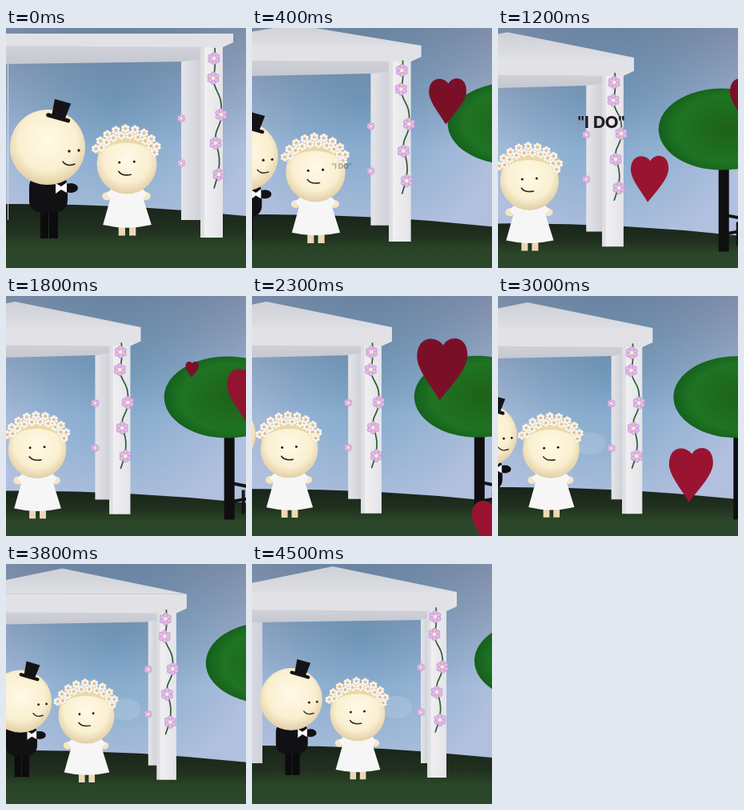
Animation, 300 px wide and 300 px high, one loop 4600 ms. Source, as an HTML page:

```html
<!DOCTYPE html>
<html lang="en">
<head>
<meta charset="utf-8">
<title>I do</title>
<style>
html,body{margin:0;width:100%;height:100%;overflow:hidden;background:#9db4d4}
svg{display:block;width:100%;height:100%}
#vow{font:900 20px Lato,"Open Sans",sans-serif;text-anchor:middle;fill:#211d24;stroke:#d5d3d8;stroke-width:.6;paint-order:stroke}
.face{fill:none;stroke:#2b2420;stroke-width:1.5;stroke-linecap:round}
.dot{fill:#211c1a}
</style>
</head>
<body>
<svg id="stage" viewBox="0 0 300 300" preserveAspectRatio="none">
<defs>
  <radialGradient id="sky" cx=".45" cy=".3" r=".62"><stop stop-color="#7ba5c8"/><stop offset=".45" stop-color="#8fb0d1"/><stop offset="1" stop-color="#b1c0de"/></radialGradient>
  <linearGradient id="dusk" x2="0" y2="1"><stop stop-color="#2b3a52" stop-opacity=".38"/><stop offset=".5" stop-color="#2b3a52" stop-opacity="0"/></linearGradient>
  <linearGradient id="grass" x2="0" y2="1"><stop stop-color="#19241a"/><stop offset=".4" stop-color="#20301e"/><stop offset=".65" stop-color="#2a4427"/><stop offset="1" stop-color="#2b482b"/></linearGradient>
  <linearGradient id="post"><stop stop-color="#dcdce0"/><stop offset=".18" stop-color="#e2e2e5"/><stop offset=".2" stop-color="#f0eff1"/><stop offset="1" stop-color="#e4e3e8"/></linearGradient>
  <linearGradient id="rearPost"><stop stop-color="#e4e4e8"/><stop offset="1" stop-color="#cfd1d9"/></linearGradient>
  <linearGradient id="roofFill" x2="0" y2="1"><stop stop-color="#cfd0d6"/><stop offset="1" stop-color="#dedfe3"/></linearGradient>
  <linearGradient id="beamFill" x2="0" y2="1"><stop stop-color="#d2d3d9"/><stop offset="1" stop-color="#c6c8d1"/></linearGradient>
  <radialGradient id="skin" cx=".5" cy=".42" r=".6"><stop stop-color="#fffae6"/><stop offset=".65" stop-color="#faefd0"/><stop offset="1" stop-color="#dfcba0"/></radialGradient>
  <radialGradient id="leaf" cx=".55" cy=".5" r=".55"><stop stop-color="#1e6118"/><stop offset=".75" stop-color="#1f7423"/><stop offset="1" stop-color="#14601c"/></radialGradient>
  <g id="daisy"></g>
  <g id="bloom"></g>
  <path id="heart" d="M-.05 .61C-.2 .35-.5 0-.5-.25C-.5-.68-.12-.68 .02-.48C.12-.68 .5-.7 .5-.28C.5 0 .15 .35-.05 .61Z"/>
</defs>
<rect width="300" height="300" fill="url(#sky)"/>
<rect width="300" height="300" fill="url(#dusk)"/>
<ellipse id="wisp" rx="20" ry="14" fill="#e3e8f3"/>
<path id="ground" fill="url(#grass)"/>
<g id="tree">
  <path d="M-4 30H9V153H-4Z" fill="#100f10"/>
  <path d="M8 108L48 116M8 130L48 123M20 116V146" stroke="#151315" stroke-width="4" fill="none"/>
  <ellipse rx="79" ry="51" fill="url(#leaf)"/>
</g>
<g id="hearts"></g>
<path id="leftPost" fill="url(#rearPost)"/>
<path id="backPost" fill="url(#rearPost)"/>
<g id="backFlowers"></g>
<path id="beam" fill="url(#beamFill)"/>
<path id="frontPost" fill="url(#post)"/>
<path id="slab" fill="#e2e2e6"/>
<path id="roof" fill="url(#roofFill)"/>
<path id="vine" fill="none" stroke="#2a5c33" stroke-width="1.7"/>
<g id="flowers"></g>
<g id="groom">
  <path d="M-9 76H1V114H-9ZM2 76H13V114H2Z" fill="#0c0b0d"/>
  <rect x="-23" y="34" width="48" height="48" rx="15" fill="#111013"/>
  <ellipse cx="29" cy="51" rx="9" ry="6" fill="#111013"/>
  <circle r="47" fill="url(#skin)"/>
  <path d="M10 45L17 49L24 44V57L17 53L10 58Z" fill="#fafafa"/>
  <g transform="translate(15 -45)rotate(16)" fill="#151315"><path d="M-10-13H11L9 8H-8Z"/><rect x="-15" y="6" width="31" height="5" rx="2.5"/></g>
  <circle class="dot" cx="27" cy="5" r="1.7"/><circle class="dot" cx="39" cy="4" r="1.7"/>
  <path class="face" d="M19 18Q24 25 34 21"/>
</g>
<g id="bride">
  <path d="M-10 72H-2V87H-10ZM3 72H11V87H3Z" fill="#ecd8b4"/>
  <ellipse cx="-24" cy="39" rx="6" ry="5" fill="#f5e6c4"/><ellipse cx="23" cy="39" rx="6" ry="5" fill="#f5e6c4"/>
  <path d="M-16 28H17L25 36L20 42L30 74Q0 81-29 74L-20 42L-25 36Z" fill="#f7f6f7"/>
  <circle r="36.5" fill="url(#skin)"/>
  <path d="M-36-10C-29-46 30-46 36-8C24-31-22-32-36-10Z" fill="#ead9a4"/>
  <g id="crown"></g>
  <circle class="dot" cx="-9" cy="-2" r="1.5"/><circle class="dot" cx="9" cy="-3" r="1.5"/>
  <path class="face" d="M-10 9Q-6 15 5 13"/>
</g>
<text id="vow" y="7">"I DO"</text>
</svg>
<script>
const $ = id => document.getElementById(id);
const LOOP = 4600, STEP = 100;

// Camera keys: time, x of the front post, y of the eave.
const CAMERA = [[0, 243, 7], [400, 171, 22], [1200, 130, 37], [2300, 136, 39], [3000, 155, 40], [4500, 219, 35]];
// Hearts: offset from the tree, full width.
const HEARTS = [[-79, 54], [34, 60], [-44, 63]];
// Garland: sideways sway and share of its length.
const GARLAND = [[0, 0], [-1, .17], [9, .485], [2, .73], [6, 1]];

const clamp = (v, lo = 0, hi = 1) => Math.min(hi, Math.max(lo, v));
const mix = (a, b, k) => a + (b - a) * k;

// Smooth curve through unevenly timed keys.
function curve(t, keys, col) {
  const last = keys.length - 1;
  if (t >= keys[last][0]) return keys[last][col];
  const i = keys.findIndex(k => k[0] > t) - 1;
  const slope = n => {
    const a = keys[Math.max(n - 1, 0)], b = keys[Math.min(n + 1, last)];
    return (b[col] - a[col]) / (b[0] - a[0]);
  };
  const h = keys[i + 1][0] - keys[i][0], u = (t - keys[i][0]) / h, v = 1 - u;
  return mix(keys[i][col], keys[i + 1][col], u * u * (3 - 2 * u))
    + h * u * v * (slope(i) * v - slope(i + 1) * u);
}
function add(parent, tag, attrs) {
  const el = document.createElementNS("http://www.w3.org/2000/svg", tag);
  for (const k in attrs) el.setAttribute(k, attrs[k]);
  return parent.appendChild(el);
}
const use = (parent, id) => add($(parent), "use", {href: "#" + id});
function place(el, x, y, s = 1) {
  el.setAttribute("transform", `translate(${x} ${y})scale(${s})`);
}
const poly = (id, ...pts) => $(id).setAttribute("d", "M" + pts.join("L") + "Z");
const box = (id, l, t, r, b) => poly(id, [l, t], [r, t], [r, b], [l, b]);

function petals(id, reach, size, color, center, edge) {
  for (let i = 0; i < 6; i++) {
    const a = i / 3 * Math.PI - Math.PI / 2;
    add($(id), "circle", {cx: reach * Math.cos(a), cy: reach * Math.sin(a), r: size, fill: color, stroke: edge, "stroke-width": .6});
  }
  add($(id), "circle", {r: size * .85, fill: center});
}
petals("daisy", 3.4, 2, "#fffdf8", "#e9bd80", "#ddd2c0");
petals("bloom", 5.4, 3.2, "#e2b9ea", "#fbf0c4", "#b284c2");

// Two rows of daisies over the hair.
for (let i = 0; i < 18; i++) {
  const inner = i % 2, a = Math.PI * mix(1.11, 1.91, i / 17);
  place(use("crown", "daisy"), (40 - 5 * inner) * Math.cos(a), -6 + (37 - 8 * inner) * Math.sin(a));
}
const blooms = GARLAND.map(() => use("flowers", "bloom"));
const rear = [0, 1].map(() => use("backFlowers", "bloom"));
const heartEls = HEARTS.map(() => use("hearts", "heart"));

// near falls evenly over the loop, rush fades right after the start.
function drawGate(x, eave, near, rush) {
  const end = x + 24 + 4 * near, tip = end + 13;
  const low = eave + 20 - 7 * rush, under = eave + 38;
  const apex = x - 118, far = 2 * apex - tip;
  const backX = x - 8 - 16 * near, backFoot = eave + 214 + 19 * rush;
  box("leftPost", x - 240, low, x - 206 - 35 * near, backFoot);
  box("backPost", backX, low, x + 1, backFoot);
  box("frontPost", x, low - 3, end, eave + 232 + 23 * rush);
  poly("beam", [far, low], [end, low - 2], [x, under - 6], [backX, under - 3], [0, under], [far, under]);
  poly("slab", [far, eave], [tip, eave], [tip, low - 2], [end, low + 4], [far, low + 2]);
  poly("roof", [apex, eave - 32 * (1 - rush ** 3)], [tip, eave], [far, eave]);

  const vx = x + 10 + 7 * near, top = eave + 31, span = 129 + 16 * rush;
  const at = (dx, f) => `${vx + dx} ${top + span * f}`;
  $("vine").setAttribute("d", `M${at(1, -.09)}Q${at(3, .05)} ${at(-1, .17)}C${at(0, .3)} ${at(11, .28)} ${at(9, .485)}`
    + `C${at(9, .6)} ${at(0, .6)} ${at(2, .73)}C${at(9, .85)} ${at(8, .95)} ${at(0, 1.12)}`);
  GARLAND.forEach(([dx, f], i) => place(blooms[i], vx + dx, top + span * f, .9));
  rear.forEach((el, i) => place(el, backX, eave + 94 + 12 * rush + 56 * i, .6));
}

// Each heart swells on the tree, then drops.
function drawHeart(i, t, treeX) {
  const [dx, size] = HEARTS[i], age = t - 600 - 850 * i;
  const grow = Math.sin(clamp(1 + age / 600) * Math.PI / 2);
  const fall = Math.max(0, age) / 700, tint = clamp(fall * 1.5);
  place(heartEls[i], treeX + dx - 13 * fall, 92 + 132 * fall * fall, grow * (size - 8 * fall));
  heartEls[i].setAttribute("fill", `rgb(${mix(122, 154, tint)},${mix(16, 20, tint)},${mix(40, 50, tint)})`);
}

function draw(t) {
  const x = curve(t, CAMERA, 1), eave = curve(t, CAMERA, 2);
  const near = 1 - t / 4500, rush = Math.exp(-t / 700);

  const horizon = eave + 192 + 21 * near;
  $("ground").setAttribute("d", `M0 ${horizon}Q150 ${horizon - 1} 300 ${horizon + 15}V300H0Z`);
  const treeX = x + 138 + 16 * near;
  place($("tree"), treeX, eave + 86 + 20 * rush);
  HEARTS.forEach((_, i) => drawHeart(i, t, treeX));
  drawGate(x, eave, near, rush);

  const bx = x - 87 - 5 * near, by = eave + 152 + 11 * rush;
  place($("bride"), bx, by, (34 + 3 * near) / 36);
  place($("groom"), x - 170 - 21 * rush, eave + 134 + 8 * rush, (39 + 8 * rush) / 47);
  place($("wisp"), bx + 48, by - 8);
  $("wisp").setAttribute("opacity", t < 2500 ? 0 : .16);

  const rise = clamp((t - 300) / 900, 0, 1.6);
  place($("vow"), mix(110, 129, rise), mix(180, 118, rise), mix(.35, 1, rise));
  $("vow").setAttribute("opacity", clamp(Math.min(rise * 3, (1800 - t) / 500)));
}

const start = performance.now();
function tick() {
  const t = Math.max(0, performance.now() - start) % LOOP;
  draw(Math.floor(t / STEP) * STEP);
  requestAnimationFrame(tick);
}
tick();
</script>
</body>
</html>
```
